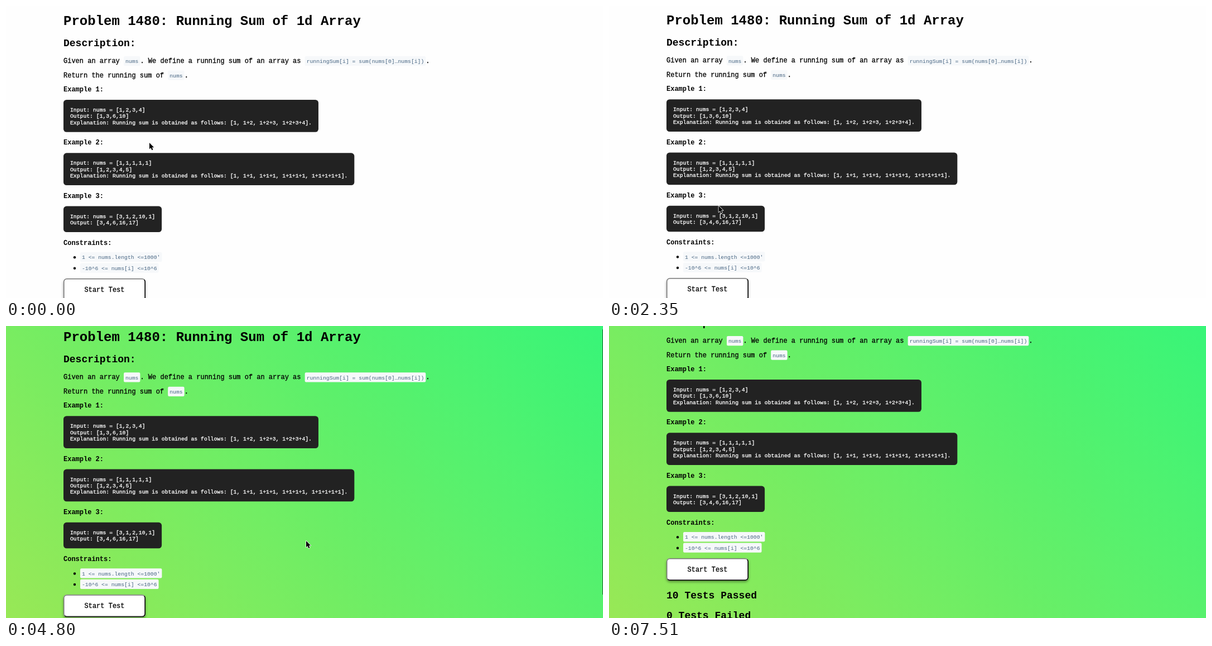
These frames come from a looping animation (1070x523 px, 7730 ms). An HTML page with a canvas:

```html
<!DOCTYPE html>
<html lang="en">
<head>
<meta charset="utf-8">
<title>Running Sum of 1d Array</title>
<style>
html, body { margin: 0; width: 100%; height: 100%; overflow: hidden; background: #fefefe; }
canvas { display: block; }
</style>
</head>
<body>
<canvas id="stage" width="1070" height="523"></canvas>
<script>
const W = 1070, H = 523, LOOP = 7730, STEP = 118, LEFT = 103;
const FONT = '"Liberation Mono", "Courier New", monospace';
const CODE = 9.75, LINE = 11.25, PAD = 12;
const PASS_AT = 3710, SCROLL_AT = 4800, BAR_OFF = 5760;
const BTN = { x: LEFT, y: 488, w: 147, h: 40 };
const ctx = document.getElementById('stage').getContext('2d');

// Motion

// Progress from 0 to 1, advancing once per STEP
function progress(t, from, to) {
  if (t >= to) return 1;
  return Math.max(0, Math.floor((t - from) / STEP) * STEP / (to - from));
}
const smooth = p => p * p * (3 - 2 * p);
const easeOut = p => 1 - (1 - p) ** 3;

const home = { x: 257, y: 245 };
const legs = [
  { x: 196.5, y: 358, from: 1640, to: 2350 },
  { x: 184, y: 502, from: 2350, to: 2970 },
  { x: 267, y: 375, from: 3710, to: 3970 },
  { x: 538, y: 385, from: 4210, to: 4410 },
  { x: 767, y: 426, from: 5650, to: 6210 },
  { x: 1004, y: 497, from: 6450, to: 7030 },
  { x: 1046, y: 528, from: 7090, to: 7510 }
];

function cursorAt(t) {
  return legs.reduce((pos, leg) => {
    const p = smooth(progress(t, leg.from, leg.to));
    return { x: pos.x + (leg.x - pos.x) * p, y: pos.y + (leg.y - pos.y) * p };
  }, home);
}

function scrollAt(t) {
  if (t >= SCROLL_AT) return 6.75 + 65.25 * easeOut(progress(t, SCROLL_AT, SCROLL_AT + 457));
  if (t < 1640) return 0;
  const nudge = 2 * Math.sin(Math.PI * progress(t, 1640, 2350));
  return nudge + .75 * (1 - progress(t, 2470, 2970));
}

// Drawing helpers

function text(str, x, y, { size = 12, color = '#000', weight = 'normal', ink = .3 } = {}) {
  ctx.font = `${weight} ${size}px ${FONT}`;
  ctx.fillStyle = ctx.strokeStyle = color;
  ctx.fillText(str, x, y);
  if (ink) {
    ctx.lineWidth = ink;
    ctx.strokeText(str, x, y);
  }
  return x + ctx.measureText(str).width;
}

const bold = (str, y, size = 12) => text(str, LEFT, y, { size, weight: 'bold', ink: 0 });

function codeWidth(str) {
  ctx.font = `${CODE}px ${FONT}`;
  return ctx.measureText(str).width;
}

function box(x, y, w, h, r) {
  ctx.beginPath();
  ctx.roundRect(x, y, w, h, r);
}

function panel(x, y, w, h, r, color) {
  box(x, y, w, h, r);
  ctx.fillStyle = color;
  ctx.fill();
}

function code(str, x, y) {
  const w = codeWidth(str) + 6;
  panel(x, y - 12.2, w, 17.25, 2.25, '#f6f8fa');
  text(str, x + 3, y, { size: CODE, color: '#476582', ink: 0 });
  return x + w;
}

// Parts in backticks become code chips
function paragraph(str, y) {
  str.split('`').reduce((x, part, i) => i % 2 ? code(part, x, y + .3) : text(part, x, y), LEFT);
}

function pre(lines, y) {
  const w = Math.max(...lines.map(codeWidth)) + 2 * PAD;
  panel(LEFT, y, w, lines.length * LINE + 2 * PAD, 5.5, '#222');
  lines.forEach((s, i) => text(s, LEFT + PAD, y + 21 + i * LINE, { size: CODE, color: '#fff' }));
}

function bullet(str, y) {
  ctx.fillStyle = '#000';
  ctx.beginPath();
  ctx.arc(123, y - 3, 2.2, 0, Math.PI * 2);
  ctx.fill();
  code(str, 133, y);
}

function button() {
  const { x, y, w, h } = BTN;
  const border = color => {
    box(x + .75, y + .75, w - 1.5, h - 1.5, 5.25);
    ctx.lineWidth = 1.5;
    ctx.strokeStyle = color;
    ctx.stroke();
  };
  ctx.save();
  ctx.shadowColor = 'rgba(0,0,0,.4)';
  ctx.shadowBlur = 4;
  ctx.shadowOffsetY = 2.5;
  panel(x, y, w, h, 6, '#fff');
  ctx.restore();
  ctx.save();
  border('#767676');
  // dark lower right half of the outset border
  ctx.beginPath();
  ctx.moveTo(x, y + h);
  ctx.lineTo(x + 6, y + h - 6);
  ctx.lineTo(x + w - 6, y + 6);
  ctx.lineTo(x + w, y);
  ctx.lineTo(x + w, y + h);
  ctx.clip();
  border('#000');
  ctx.restore();
  text('Start Test', 140.5, y + 23.5);
}

// Page content

const examples = [
  ['Input: nums = [1,2,3,4]', 'Output: [1,3,6,10]',
    'Explanation: Running sum is obtained as follows: [1, 1+2, 1+2+3, 1+2+3+4].'],
  ['Input: nums = [1,1,1,1,1]', 'Output: [1,2,3,4,5]',
    'Explanation: Running sum is obtained as follows: [1, 1+1, 1+1+1, 1+1+1+1, 1+1+1+1+1].'],
  ['Input: nums = [3,1,2,10,1]', 'Output: [3,4,6,16,17]']
];

function page() {
  bold('Problem 1480: Running Sum of 1d Array', 33.5, 24);
  bold('Description:', 72, 18);
  paragraph('Given an array `nums`. We define a running sum of an array as ' +
    '`runningSum[i] = sum(nums[0]…nums[i])`.', 102);
  paragraph('Return the running sum of `nums`.', 127.5);
  examples.forEach((lines, i) => {
    const top = 168 + 95.3 * i;
    bold(`Example ${i + 1}:`, top - 15);
    pre(lines, top);
  });
  bold('Constraints:', 427.7);
  bullet("1 <= nums.length <=1000'", 453.3);
  bullet('-10^6 <= nums[i] <=10^6', 472.8);
  button();
  bold('10 Tests Passed', 559.5, 18);
  bold('0 Tests Failed', 595.5, 18);
}

const arrow = new Path2D('M0 0V11.3L2.6 8.9 4.5 13.2 6.5 12.3 4.7 8.2H8.2Z');
const hand = new Path2D('M-1.5 1.2Q0-.6 1 1.2L1.6 4.4Q3 3.4 3.8 4.8 5.2 4 5.7 5.5 7 5 7.2 6.8V9.6L6 12V14H-.6V12.4L-3.8 8.6Q-4.2 6.8-2.6 7.2L-.9 8.4Z');
const knuckles = new Path2D('M1.2 8.8V11.6M3 8.8V11.6M4.8 8.8V11.6');

function cursor({ x, y }, scroll) {
  const dx = x - BTN.x, dy = y + scroll - BTN.y;
  const onButton = dx > 0 && dx < BTN.w && dy > 0 && dy < BTN.h;
  ctx.save();
  ctx.translate(x, y);
  ctx.lineJoin = 'round';
  if (onButton) {
    ctx.fillStyle = '#fff';
    ctx.fill(hand);
    ctx.strokeStyle = '#000';
    ctx.lineWidth = 1.1;
    ctx.stroke(hand);
    ctx.lineWidth = .7;
    ctx.stroke(knuckles);
  } else {
    ctx.strokeStyle = '#fff';
    ctx.lineWidth = 1.5;
    ctx.stroke(arrow);
    ctx.fillStyle = '#000';
    ctx.fill(arrow);
  }
  ctx.restore();
}

// Fixed 45 degree backdrop
const reach = (W + H) / 4;
const green = ctx.createLinearGradient(W / 2 - reach, H / 2 + reach, W / 2 + reach, H / 2 - reach);
green.addColorStop(0, '#98e856');
green.addColorStop(1, '#38f578');

function draw(t) {
  const scroll = scrollAt(t);
  ctx.fillStyle = t >= PASS_AT ? green : '#fefefe';
  ctx.fillRect(0, 0, W, H);
  ctx.save();
  ctx.translate(0, -scroll);
  page();
  ctx.restore();
  if (t >= SCROLL_AT && t < BAR_OFF) {
    ctx.fillStyle = 'rgba(0,0,0,.6)';
    ctx.fillRect(W - 1, scroll * .9, 1, 475);
  }
  cursor(cursorAt(t), scroll);
}

const start = performance.now();
function loop() {
  draw((performance.now() - start) % LOOP);
  requestAnimationFrame(loop);
}
loop();
</script>
</body>
</html>
```
